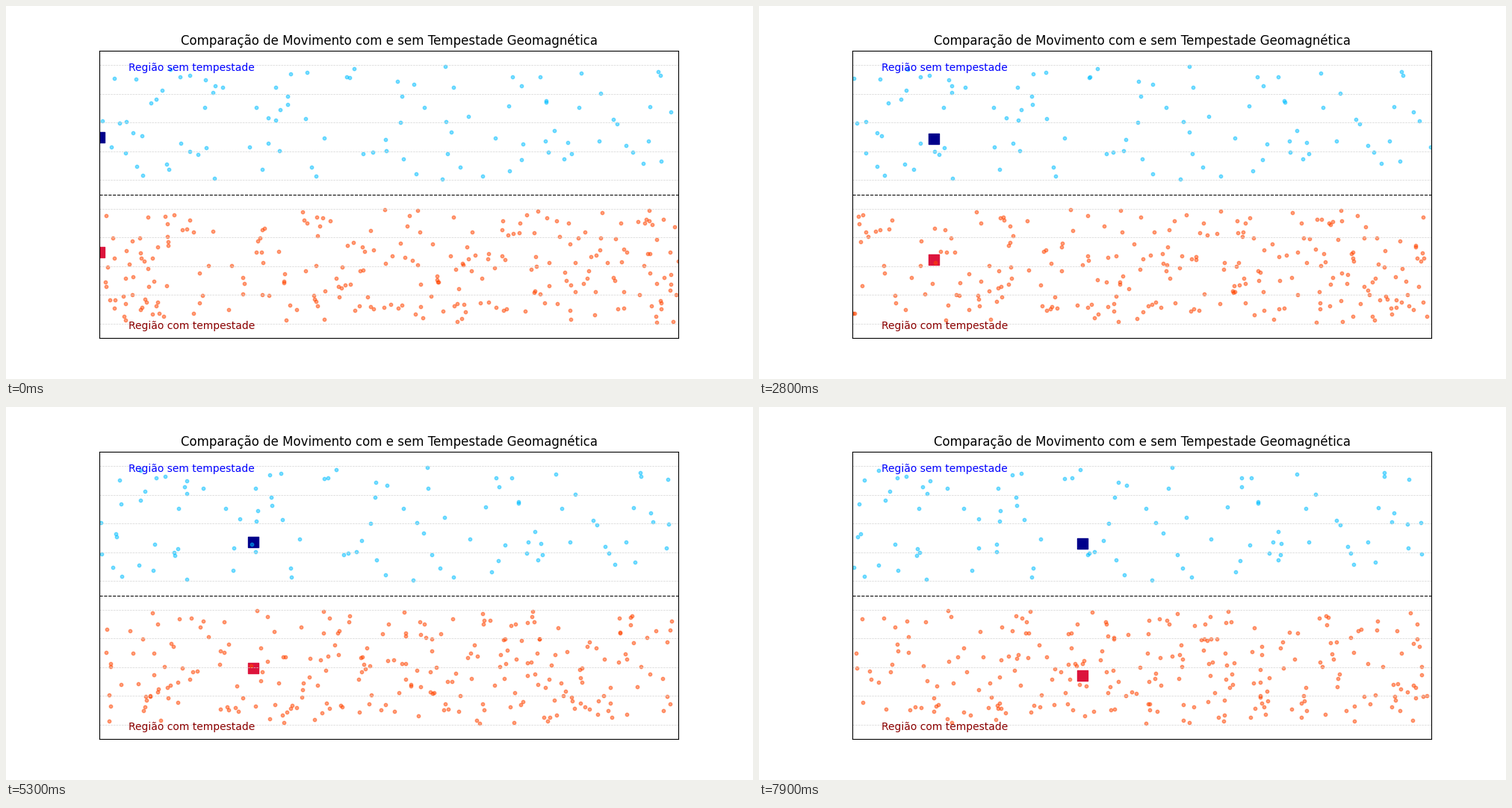
Animation, 1000 px wide and 500 px high, one loop 8000 ms. Source, as a matplotlib script:

```python
import numpy as np
import matplotlib.pyplot as plt
from matplotlib.animation import FuncAnimation

FRAMES, INTERVAL = 80, 100
WIDTH = 100
CALM, STORM = 100, 250

np.random.seed(42)


def make_particles(n, y_range, speed_range):
    x = np.random.uniform(0, WIDTH, n)
    y = np.random.uniform(*y_range, n)
    speed = np.random.uniform(*speed_range, n)
    return x, y, speed


calm = make_particles(CALM, (1, 9), (0.05, 0.1))
storm = make_particles(STORM, (-9, -1), (0.3, 0.6))
path = np.linspace(0, WIDTH, 200)

fig, ax = plt.subplots(figsize=(10, 5), dpi=100)
ax.set_xlim(0, WIDTH)
ax.set_ylim(-10, 10)
ax.set_xticks([])
ax.set_yticks([])
ax.set_title("Comparação de Movimento com e sem Tempestade Geomagnética")

for level in range(-9, 10, 2):
    ax.axhline(level, color="lightgray", linestyle="--", linewidth=0.5)
ax.axhline(0, color="black", linestyle="--", linewidth=0.8)

ax.text(0.05, 0.93, "Região sem tempestade", color="blue",
        fontsize=10, transform=ax.transAxes)
ax.text(0.05, 0.03, "Região com tempestade", color="darkred",
        fontsize=10, transform=ax.transAxes)

calm_box = ax.scatter([0], [4], s=100, marker="s", color="darkblue")
storm_box = ax.scatter([0], [-4], s=100, marker="s", color="crimson")
calm_dots = ax.scatter(calm[0], calm[1], s=10, color="deepskyblue", alpha=0.5)
storm_dots = ax.scatter(storm[0], storm[1], s=10, color="orangered", alpha=0.5)


def drift(dots, particles, step):
    x, y, speed = particles
    dots.set_offsets(np.column_stack([(x - speed * step) % WIDTH, y]))


def update(i):
    drift(calm_dots, calm, i)
    drift(storm_dots, storm, i)
    x = path[i]
    calm_box.set_offsets([[x, 4 - 0.01 * x]])
    storm_box.set_offsets([[x, -4 - 0.04 * x]])
    return calm_dots, storm_dots, calm_box, storm_box


anim = FuncAnimation(fig, update, frames=FRAMES, interval=INTERVAL,
                     repeat=True, repeat_delay=0)
plt.show()
```
